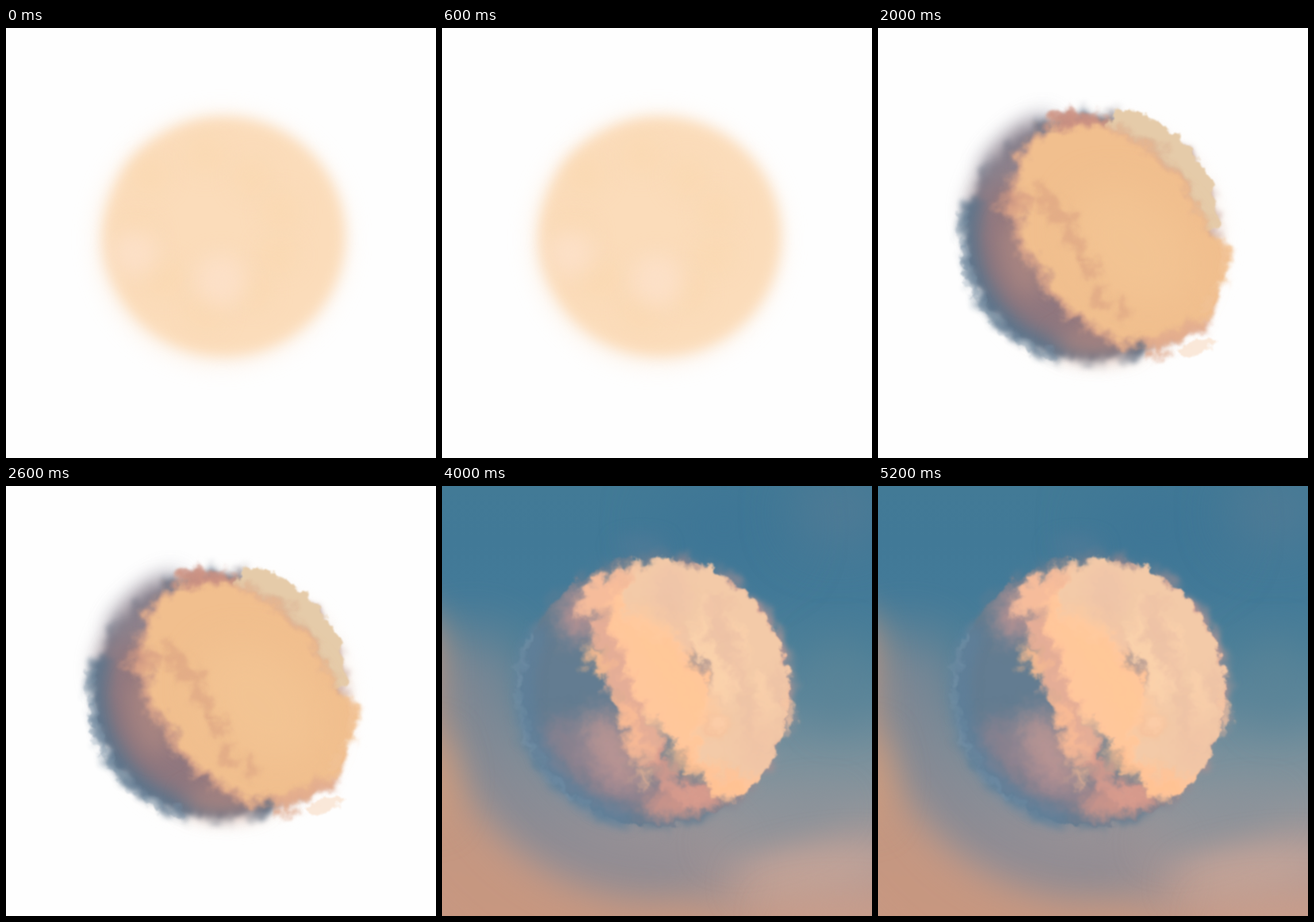
Recreate the animation shown at these times as an HTML page. Size 748 by 748 pixels, loop 6 s.

```html
<!DOCTYPE html>
<html lang="en">
<head>
<meta charset="utf-8">
<title>Cloud planet</title>
<style>
  html, body { margin: 0; width: 100%; height: 100%; overflow: hidden; background: #fefefe; }
  svg { display: block; width: 100%; height: 100%; }
</style>
</head>
<body>
<svg id="stage" viewBox="0 0 748 748"></svg>
<script>
const stage = document.getElementById('stage');
const CENTER = { x: 371, y: 357 };
const RADIUS = 234;
const LOOP = 6000;
const REGION = 'filterUnits="userSpaceOnUse" x="-160" y="-160" width="1068" height="1068" color-interpolation-filters="sRGB"';

// Angles are degrees, clockwise from the right.
const polar = (angle, r) => [
  CENTER.x + r * Math.cos(angle * Math.PI / 180),
  CENTER.y + r * Math.sin(angle * Math.PI / 180),
];

function seeded(seed) {
  return () => {
    seed = (seed * 16807) % 2147483647;
    return seed / 2147483647;
  };
}

const scatter = (count, seed, paint) => {
  const random = seeded(seed);
  return Array.from({ length: count }, (_, i) => paint((i + .5) / count, random)).join('');
};

const spot = (fill, filter, opacity, x, y, rx, ry = rx, turn = 0) =>
  `<ellipse rx="${rx}" ry="${ry}" transform="translate(${x} ${y}) rotate(${turn})" fill="${fill}" opacity="${opacity}" style="filter:none"/>`
    .replace('<ellipse', `<g filter="url(#${filter})"><ellipse`).replace(' style="filter:none"', '') + '</g>';

const brush = (color, filter, opacity, width, d) =>
  `<g filter="url(#${filter})" opacity="${opacity}"><path d="${d}" fill="none" stroke="${color}"
    stroke-width="${width}" stroke-linecap="round" stroke-linejoin="round"/></g>`;

const arc = (color, filter, opacity, width, r, from, to) =>
  brush(color, filter, opacity, width, `M${polar(from, r)}A${r} ${r} 0 0 1 ${polar(to, r)}`);

// Small puffs strewn along a line.
const puffs = (color, count, seed, [x1, y1], [x2, y2], size) => scatter(count, seed, (t, random) => {
  const jitter = () => (random() - .5) * size * 1.4;
  const r = size * (.5 + random() * .6);
  return spot(color, 'puff', .65, x1 + (x2 - x1) * t + jitter(), y1 + (y2 - y1) * t + jitter(), r, r * .7, 40);
});

// Torn wisps along the rim.
const wisps = (color, count, seed, r, from, to) => scatter(count, seed, (t, random) => {
  const angle = from + (to - from) * t;
  const [x, y] = polar(angle, r + random() * 10);
  return spot(color, 'edge', .2 + random() * .35, x, y, 5 + random() * 6, 10 + random() * 10, angle);
});

const blur = n => `<filter id="soft${n}" ${REGION}><feGaussianBlur stdDeviation="${n}"/></filter>`;

const billow = (id, frequency, scale, before, after) => `<filter id="${id}" ${REGION}>
  <feTurbulence type="fractalNoise" baseFrequency="${frequency}" numOctaves="5" seed="7" result="noise"/>
  <feGaussianBlur in="SourceGraphic" stdDeviation="${before}"/>
  <feDisplacementMap in2="noise" scale="${scale}" xChannelSelector="R" yChannelSelector="G"/>
  <feGaussianBlur stdDeviation="${after}"/></filter>`;

const stipple = `<filter id="stipple" ${REGION}>
  <feTurbulence type="fractalNoise" baseFrequency=".45" numOctaves="1" seed="4"/>
  <feColorMatrix values="0 0 0 0 0  0 0 0 0 0  0 0 0 0 0  0 0 0 1 0" result="grain"/>
  <feGaussianBlur in="SourceAlpha" stdDeviation="6"/>
  <feComposite in2="grain" operator="arithmetic" k2="1" k3="1.6" k4="-.8"/>
  <feComponentTransfer result="mask"><feFuncA type="linear" slope="3" intercept="-.95"/></feComponentTransfer>
  <feMorphology in="SourceGraphic" operator="dilate" radius="10"/>
  <feComposite in2="mask" operator="in"/></filter>`;

const gradient = (id, coords, colors) => `<linearGradient id="${id}" gradientUnits="userSpaceOnUse" ${coords}>` +
  colors.map((color, i) => `<stop offset="${i / (colors.length - 1)}" stop-color="${color}"/>`).join('') +
  '</linearGradient>';

const defs = '<defs>' + [6, 11, 18, 32, 50].map(blur).join('') +
  billow('edge', .05, 26, 1.5, 1) +
  billow('puff', .032, 44, 6, 1.5) +
  billow('mist', .03, 36, 8, 3) +
  stipple +
  gradient('air', 'x1="0" y1="0" x2="0" y2="748"',
    ['#427a96', '#417997', '#437a98', '#4c7f98', '#5d869a', '#78909c', '#91959b', '#b29b97', '#c49a89']) +
  gradient('body', 'x1="135" y1="400" x2="500" y2="310"',
    ['#5d7187', '#82777f', '#9f8280', '#b48a82', '#c79584', '#dbaa87', '#e6b78a', '#e0b98f']) +
  `<clipPath id="round"><circle cx="${CENTER.x}" cy="${CENTER.y}" r="${RADIUS}"/></clipPath></defs>`;

const wash = () =>
  spot('#fbe3c8', 'soft18', .35, 375, 368, 222) +
  spot('#fbdcba', 'soft11', 1, 379, 363, 210, 208) +
  scatter(9, 31, (t, random) => {
    const [x, y] = polar(t * 360, 110 + random() * 60);
    return spot('#fbd7ae', 'soft18', .45, x, y, 34);
  }) +
  spot('#fde2cb', 'soft18', .8, 225, 390, 40) +
  spot('#fde2cb', 'soft18', .8, 375, 440, 45);

const blocks = () => wash() +
  arc('#5d7690', 'stipple', .98, 84, 184, 108, 202) +
  spot('#8d8893', 'stipple', .85, 196, 282, 27) +
  arc('#81758a', 'soft6', .97, 58, 162, 82, 197) +
  spot('#7a7186', 'stipple', .8, 411, 549, 52, 40) +
  brush('#d39d8d', 'stipple', .95, 96, 'M256,208L336,202') +
  brush('#d39d8d', 'stipple', .9, 64, 'M262,300L278,432') +
  spot('#d39d8d', 'stipple', .9, 554, 428, 36) +
  brush('#d49a8b', 'stipple', 1, 132, 'M292,260L320,365L325,420L430,368L500,412L516,450L512,508L430,450L325,420') +
  brush('#d79d87', 'soft11', .6, 40, 'M285,420L330,470L375,468L430,502') +
  scatter(6, 9, (t, random) => spot('#dfac9a', 'soft11', .7, 310 + t * 220, 310 + t * 180 + random() * 60, 15));

const clouds = () =>
  spot('#fae8d8', 'soft18', .5, 385, 372, 212) +
  arc('#aaa7b3', 'soft18', .75, 44, 205, 214, 246) +
  spot('url(#body)', 'mist', 1, 375, 364, 216) +
  arc('#8f828c', 'soft18', 1, 90, 172, 192, 236) +
  arc('#56748d', 'mist', .95, 42, 204, 106, 192) +
  arc('#90777e', 'soft18', 1, 100, 147, 68, 196) +
  spot('#b38b82', 'soft18', .7, 250, 400, 32, 70, -15) +
  spot('#b58980', 'soft18', .7, 380, 548, 70, 25) +
  wisps('#7890a5', 14, 5, 222, 106, 190) +
  brush('#d59b86', 'puff', .9, 36, 'M315,165L385,170L440,215') +
  arc('#e5cba9', 'edge', 1, 58, 197, 287, 352) +
  arc('#dfbb9b', 'puff', .9, 45, 166, 285, 355) +
  spot('#dca58a', 'puff', .85, 408, 362, 222, 152, 52) +
  spot('#f1bf8e', 'puff', 1, 416, 360, 217, 142, 52) +
  spot('#f1bf8e', 'puff', 1, 572, 412, 36, 66) +
  spot('#f3c594', 'soft32', .8, 440, 380, 120, 85, 45) +
  puffs('#dca383', 9, 17, [285, 260], [420, 500], 22) +
  spot('#d69b83', 'puff', .65, 238, 302, 34, 18) +
  spot('#c98e80', 'puff', .7, 350, 158, 46, 13, 6) +
  spot('#dfa78e', 'puff', .7, 520, 536, 64, 16, -20) +
  wisps('#f2c59b', 6, 8, 232, 2, 34) +
  spot('#f9e3d0', 'edge', .8, 556, 556, 38, 11, -15);

// Streaks that follow the curve of the lit side.
const streaks = (color, count, seed) => scatter(count, seed, (t, random) => {
  const angle = -75 + t * 100;
  const [x, y] = polar(angle, 110 + random() * 105);
  return spot(color, 'puff', .7, x, y, 13 + random() * 8, 32 + random() * 22, -10 + angle * .15);
});

const planet = () =>
  spot('url(#body)', 'mist', .8, CENTER.x, CENTER.y, RADIUS + 2) +
  arc('#60768b', 'mist', .75, 18, 230, 108, 208) +
  `<g filter="url(#edge)"><g clip-path="url(#round)">` +
  spot('url(#body)', 'soft6', 1, CENTER.x, CENTER.y, RADIUS + 20) +
  arc('#596f85', 'soft11', .8, 40, 234, 106, 222) +
  arc('#8c7881', 'soft18', .75, 62, 182, 88, 155) +
  spot('#b98c83', 'soft18', .8, 238, 222, 32, 46, 15) +
  spot('#be8f83', 'soft18', .75, 296, 460, 40, 75, -30) +
  spot('#c28c79', 'soft11', .85, 420, 548, 70, 28, -10) +
  brush('#ddae8a', 'puff', 1, 64, 'M268,196L345,165') +
  brush('#dba686', 'puff', .9, 58, 'M285,250L320,350L360,450') +
  brush('#e8b98a', 'puff', 1, 112, 'M345,215L385,330L450,425L515,495') +
  arc('#dbbb97', 'puff', 1, 145, 166, 275, 390) +
  spot('#d8b498', 'soft11', .8, 398, 185, 32, 46) +
  streaks('#e3c39c', 8, 23) +
  streaks('#d6b394', 6, 71) +
  spot('#d8b394', 'soft18', .8, 555, 450, 30, 60, 15) +
  brush('#ecba86', 'soft18', .9, 50, 'M350,250L420,345L445,400') +
  spot('#ddb48c', 'soft6', .9, 477, 417, 24, 21) +
  spot('#e5c29b', 'soft6', .8, 481, 413, 14, 10) +
  brush('#c6917d', 'puff', .85, 34, 'M375,475L400,520L455,548') +
  puffs('#e3b182', 7, 13, [245, 275], [275, 325], 15) +
  puffs('#e2b084', 10, 41, [300, 350], [362, 515], 17) +
  puffs('#e9b481', 10, 29, [390, 470], [530, 525], 22) +
  '</g></g>' +
  wisps('#7c8ea0', 14, 3, 230, 120, 205) +
  wisps('#e1b892', 5, 19, 232, 2, 18);

const sphere = () =>
  spot('#f3f1f0', 'soft32', .75, 30, 235, 32, 70) +
  spot('#f2f2f3', 'soft32', .75, 10, 365, 35, 65) +
  spot('#f4f2f0', 'soft18', .75, 20, 535, 14, 40) +
  spot('#efeff5', 'soft18', .85, 348, 652, 60, 28, 10) +
  arc('#f7f6f7', 'soft32', .8, 70, 385, 100, 165) +
  arc('#c9c9d1', 'soft11', .6, 14, 234, 235, 255) +
  planet();

const sky = () => `<rect width="748" height="748" fill="url(#air)"/>` +
  arc('#878892', 'soft50', .85, 140, 320, 80, 185) +
  arc('#c8977f', 'soft32', .9, 190, 465, 85, 188) +
  spot('#d3a17f', 'soft32', .6, -15, 510, 35, 80) +
  spot('#3e7596', 'soft50', .7, 490, 70, 110, 85) +
  spot('#5f7d94', 'soft50', .7, 690, 45, 70, 50) +
  spot('#5d8496', 'soft32', .6, 690, 340, 50, 80) +
  spot('#849099', 'soft32', .6, 585, 590, 120, 32, -18) +
  spot('#c9a99b', 'soft32', .85, 650, 670, 130, 28, -10) +
  spot('#cba291', 'soft32', .7, 690, 745, 120, 26) +
  spot('#75809a', 'soft18', .5, 345, 105, 45, 10) +
  `<g style="filter:brightness(1.09) hue-rotate(-6deg)">${planet()}</g>` +
  arc('#5f84a3', 'soft11', .5, 34, 228, 105, 205);

const scenes = [[1000, wash], [2000, blocks], [3000, clouds], [4000, sphere], [LOOP, sky]];

stage.innerHTML = defs + '<rect width="748" height="748" fill="#fefefe"/>' +
  scenes.map(([, paint]) => `<g class="scene" display="none">${paint()}</g>`).join('');
const groups = stage.querySelectorAll('.scene');

let shown = -1;
function update(time) {
  const current = scenes.findIndex(([end]) => time % LOOP < end);
  if (current === shown) return;
  groups.forEach((g, i) => g.setAttribute('display', i === current ? 'inline' : 'none'));
  shown = current;
}

const start = performance.now();
function tick() {
  update(performance.now() - start);
  requestAnimationFrame(tick);
}
tick();
</script>
</body>
</html>
```
